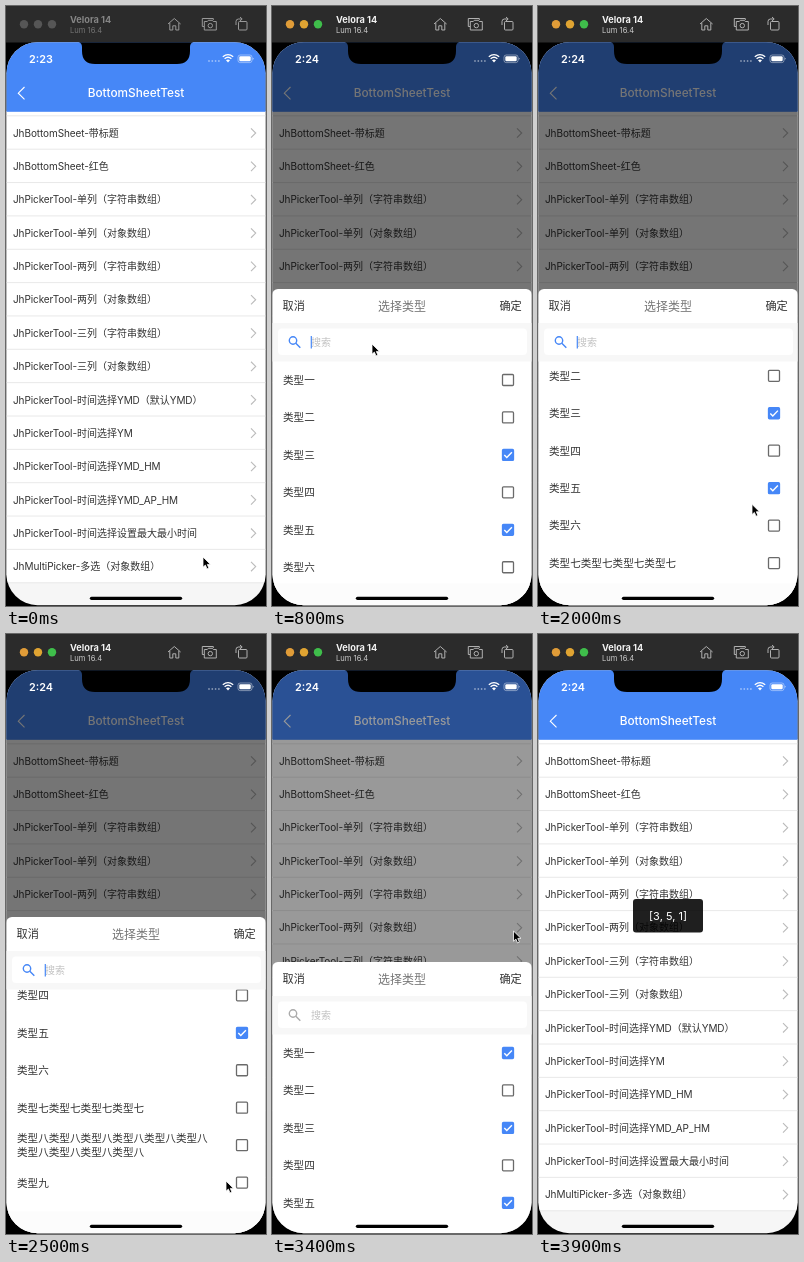
Animation of 260 by 600 pixels, one loop 4000 ms. Source, as an HTML page:

```html
<!DOCTYPE html>
<html lang="zh">
<head>
<meta charset="utf-8">
<style>
html, body { margin: 0; width: 100%; height: 100%; overflow: hidden; background: #000; }
svg { display: block; width: 260px; height: 600px; font-family: Inter, 'Noto Sans CJK SC', 'Noto Sans CJK', sans-serif; }
text { white-space: pre; }
</style>
</head>
<body>
<svg viewBox="0 0 260 600" fill="none">
  <defs>
    <clipPath id="screen"><rect x=".5" y="36.200" width="259" height="563" rx="31"/></clipPath>
    <clipPath id="view"><rect y="72.500" width="260" height="222"/></clipPath>
  </defs>
  <rect width="260" height="600" fill="#000"/>
  <rect width="260" height="36.500" fill="#2b2b2b"/>
  <g id="lights"><circle cx="18" cy="18.300" r="4.200"/><circle cx="32" cy="18.300" r="4.200"/><circle cx="46" cy="18.300" r="4.200"/></g>
  <g id="device">
    <text x="64" y="17" font-size="9.200" font-weight="700">Velora 14</text>
    <text x="64" y="26.500" font-size="7.600" opacity=".8">Lum 16.4</text>
  </g>
  <g id="tools" stroke-linejoin="round">
    <path d="M162 18 168.300 12.500 174.600 18M163.800 17V24H166.800V19.800H169.800V24H172.800V17"/>
    <path d="M198 20.500H196.300V12.500H207.300V14"/>
    <path d="M198.300 15.500H201.300L202.300 14.300H206.300L207.300 15.500H210.300V24H198.300Z"/>
    <circle cx="204.300" cy="19.600" r="2.200"/>
    <rect x="232.500" y="15.500" width="8.500" height="8.500" rx="1"/>
    <path d="M230 19V15.500Q230 13 232.500 13H236M234 11 236.200 13 234 15"/>
  </g>
  <g clip-path="url(#screen)">
    <rect y="36" width="260" height="564" fill="#f6f6f6"/>
    <rect y="105" width="260" height="472" fill="#fff"/>
    <g id="menu"></g>
    <rect y="36" width="260" height="69.800" fill="#4687f7"/>
    <path d="M18.500 81 12.300 87.200 18.500 93.400" stroke="#fff" stroke-width="1.100"/>
    <text x="130" y="91.200" font-size="11.800" font-weight="500" fill="#fff" text-anchor="middle">BottomSheetTest</text>
    <rect id="dim" y="36" width="260" height="564" fill="#000"/>
    <g id="sheet">
      <rect width="260" height="400" rx="6" fill="#fff"/>
      <text x="10.500" y="21" font-size="11.200" fill="#333">取消</text>
      <text x="130" y="21.500" font-size="12" fill="#777" text-anchor="middle">选择类型</text>
      <text x="249.800" y="21" font-size="11.200" fill="#333" text-anchor="end">确定</text>
      <rect y="34" width="260" height="38.500" fill="#f7f7f7"/>
      <rect x="6" y="39.500" width="249" height="26.500" rx="4" fill="#fff"/>
      <g id="lens" stroke-width="1.400"><circle cx="21" cy="51.500" r="3.700"/><path d="M23.800 54.300 28.300 58.800"/></g>
      <text id="query" x="39" y="56.700" font-size="10"></text>
      <path id="caret" d="M0 47V59.500" stroke="#4687f7" stroke-width="1.200"/>
      <g id="clear"><circle cx="237.300" cy="53" r="5.500" fill="#bdbdbd"/><path d="M235.200 50.900 239.400 55.100M239.400 50.900 235.200 55.100" stroke="#fff" stroke-width="1.200"/></g>
      <g clip-path="url(#view)"><g id="options"></g></g>
      <rect y="294.500" width="260" height="110" fill="#fcfcfc"/>
    </g>
    <g id="toast">
      <rect x="95" y="265" width="70" height="33.500" rx="3" fill="#000" fill-opacity=".88"/>
      <text x="130" y="285.700" font-size="11" fill="#fff" text-anchor="middle">[3, 5, 1]</text>
    </g>
    <path d="M70 35.500Q76 36 76 41V45Q76 58 89 58H171Q184 58 184 45V41Q184 36 190 35.500Z" fill="#000"/>
    <text id="clock" x="23" y="56.700" font-size="10.800" font-weight="600" fill="#fff"></text>
    <g fill="#fff">
      <g opacity=".45"><circle cx="203" cy="55" r=".9"/><circle cx="206.300" cy="55" r=".9"/><circle cx="209.600" cy="55" r=".9"/><circle cx="212.900" cy="55" r=".9"/></g>
      <path d="M222 56.500 220 54.300Q222 52.700 224 54.300Z"/>
      <rect x="233.300" y="50.300" width="11.400" height="5" rx="1.200"/>
      <path d="M246.800 51.500Q248.300 52.700 246.800 54Z"/>
    </g>
    <g stroke="#fff">
      <path d="M218.600 52.700Q222 49.700 225.400 52.700M216.800 50.800Q222 46.400 227.200 50.800" stroke-width="1.300"/>
      <rect x="232" y="49" width="14" height="7.600" rx="2.200" stroke-width=".7" opacity=".6"/>
    </g>
    <path d="M85.500 592.300H174.500" stroke="#000" stroke-width="3.300" stroke-linecap="round"/>
  </g>
  <path id="cursor" d="M0 0V10.200L2.400 8.100 4 11.900 5.900 11.100 4.300 7.400H7.500Z" fill="#000" stroke="#fff" stroke-width=".8" stroke-linejoin="round"/>
</svg>
<script>
const $ = id => document.getElementById(id);
const set = (el, attrs) => { for (const k in attrs) el.setAttribute(k, attrs[k]); };
const show = (id, on) => set($(id), { visibility: on ? 'inherit' : 'hidden' });
const move = (id, x, y) => set($(id), { transform: `translate(${x} ${y})` });
const BLUE = '#4687f7', LOOP = 4000, STEP = 100;

const picker = 'JhPickerTool-';
const menu = [
  'JhBottomSheet-带标题', 'JhBottomSheet-红色',
  ...['单列', '两列', '三列'].flatMap(c => ['字符串', '对象'].map(k => `${picker}${c}（${k}数组）`)),
  ...['YMD（默认YMD）', 'YM', 'YMD_HM', 'YMD_AP_HM', '设置最大最小时间'].map(s => `${picker}时间选择${s}`),
  'JhMultiPicker-多选（对象数组）'
];
const tighten = s => s.replace(/[ -~]+/g, '<tspan letter-spacing="-.09">$&</tspan>');
const rule = y => `<path d="M0 ${y}H260" stroke="#e2e2e2" stroke-width=".8"/>`;
$('menu').innerHTML = rule(109.8) + menu.map((s, i) => {
  const y = 127 + i * 33.35;
  return `<text x="7" y="${y + 3.7}" font-size="10" fill="#333">${tighten(s)}</text>
    <path d="M245 ${y - 4.7}l4.700 4.700-4.700 4.700" stroke="#bbb" stroke-width="1.100"/>${rule(y + 16.2)}`;
}).join('');

const label = (s, y) => `<text x="11" y="${y + 3.9}" font-size="10.600" fill="#333">${s}</text>`;
$('options').innerHTML = [...'一二三四五六七八九'].map((n, i) => {
  const name = '类型' + n, y = 91 + i * 37.45;
  const text = n === '八' ? label(name.repeat(6), y - 7.3) + label(name.repeat(4), y + 7.3)
    : label(n === '七' ? name.repeat(4) : name, y);
  return `${text}<g class="box" transform="translate(236 ${y})"><rect x="-5.500" y="-5.500" width="11" height="11" rx="1" stroke-width="1.300"/>
    <path d="M-3.700 .2-1.200 2.700 3.900-2.600" stroke="#fff" stroke-width="1.400"/></g>`;
}).join('');
const boxes = document.querySelectorAll('.box');
function check(i, on) {
  const [rect, tick] = boxes[i].children;
  set(rect, { fill: on ? BLUE : 'none', stroke: on ? BLUE : '#6a6a6a' });
  set(tick, { visibility: on ? 'inherit' : 'hidden' });
}

// Keys are [time, value]; values in between are linear.
function track(keys, t) {
  const n = keys.findIndex(k => k[0] > t);
  if (n < 0) return keys[keys.length - 1][1];
  if (n === 0) return keys[0][1];
  const [a, u] = keys[n - 1], [b, v] = keys[n];
  return u + (v - u) * (t - a) / (b - a);
}
const slide = [[100, 317], [200, 75], [300, 3.3], [400, 0], [3300, 0], [3400, 45], [3500, 177], [3600, 317]];
const shade = [[100, 0], [200, .4], [300, .54], [3300, .54], [3400, .4], [3500, .13], [3600, 0]];
const scroll = [[1900, 0], [2200, 125], [2700, 125], [3000, 52], [3100, 0]];
const fade = [[3400, 0], [3500, .86], [3600, 1]];
const path = [
  [400, 197, 551], [600, 100, 338], [1100, 100, 338], [1300, 232, 373], [1500, 232, 373],
  [1700, 236, 335], [1800, 236, 335], [1900, 215, 540], [2200, 212, 415], [2500, 220, 547],
  [2700, 211, 385], [3000, 211, 458], [3100, 211, 510], [3300, 240, 299], [3500, 243, 295], [3700, 263, 285]
];
const pathX = path.map(p => [p[0], p[1]]), pathY = path.map(p => [p[0], p[2]]);

function draw(t) {
  const active = t >= 100, focus = t >= 700 && t < 3300;
  ['#e09c38', '#e0a432', '#3fbe4b'].forEach((c, i) => set($('lights').children[i], { fill: active ? c : '#565656' }));
  set($('device'), { fill: active ? '#f2f2f2' : '#858585' });
  set($('tools'), { stroke: active ? '#b0b0b0' : '#989898' });
  $('clock').textContent = t < 700 ? '2:23' : '2:24';

  move('sheet', 0, 283 + track(slide, t));
  set($('dim'), { opacity: track(shade, t) });
  move('options', 0, -track(scroll, t));
  boxes.forEach((b, i) => check(i, i === 2 || i === 4 || (i === 0 && t >= 1400)));

  const typed = t < 1800 ? '类型一'.slice(0, Math.max(0, t / 100 - 8)) : '';
  $('query').textContent = typed || '搜索';
  set($('query'), { fill: typed ? '#333' : '#c2c2c2' });
  set($('lens'), { stroke: focus ? BLUE : '#aaa' });
  show('caret', focus);
  move('caret', 39.3 + typed.length * 10, 0);
  show('clear', typed);

  const o = track(fade, t);
  set($('toast'), { opacity: o, transform: `translate(0 ${(1 - o) * 29})` });
  move('cursor', track(pathX, t), track(pathY, t));
  show('cursor', t < 3700);
}

const start = performance.now();
function frame() {
  const t = (performance.now() - start) % LOOP;
  draw(Math.floor(t / STEP) * STEP);
  requestAnimationFrame(frame);
}
draw(0);
requestAnimationFrame(frame);
</script>
</body>
</html>
```
